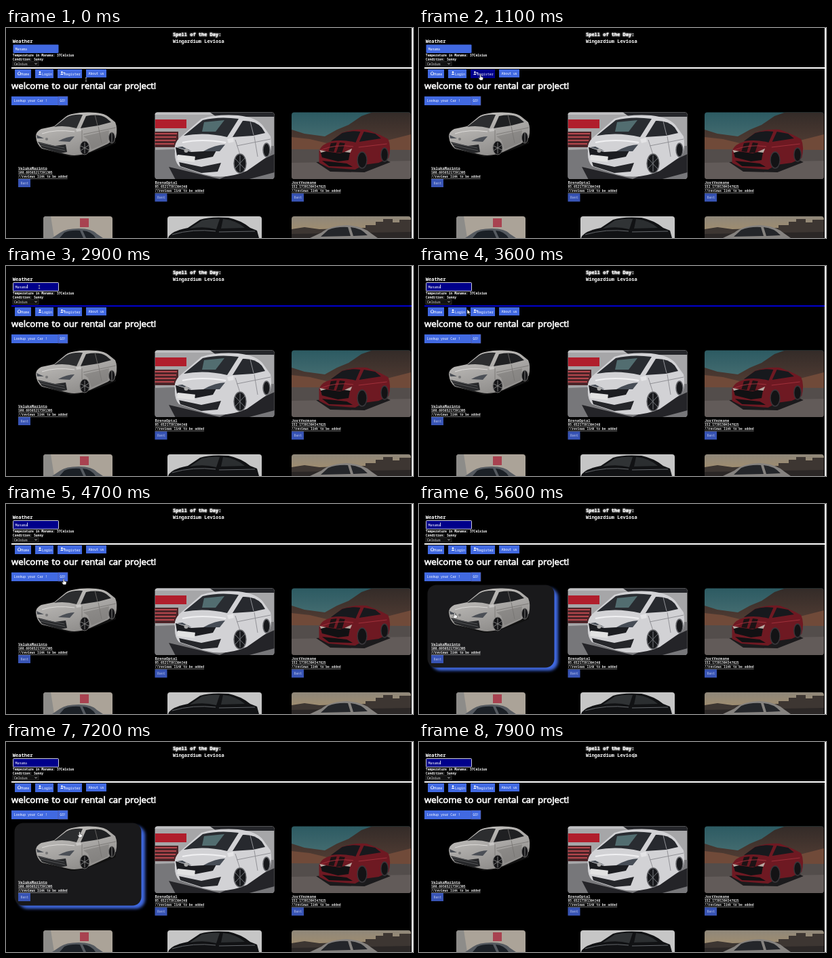
Recreate the animation shown at these times as an HTML page. Size 600 px wide and 310 px high, loop 8 s.

```html
<!DOCTYPE html>
<html lang="en">
<head>
<meta charset="utf-8">
<title>Rental cars</title>
<style>
html, body { margin: 0; width: 100%; height: 100%; overflow: hidden; background: #000; }
svg { display: block; width: 600px; height: 310px; }
text { font-family: "Noto Sans Mono", "DejaVu Sans Mono", monospace; fill: #fff; white-space: pre; }
.b { font-weight: 700; }
.u { font-weight: 600; text-decoration: underline; fill: #ddd; }
.dim { fill: #b8c3e8; }
.glow { font-weight: 700; text-shadow: 0 0 2px #fff, 0 0 3px #aaa; }
.title { font-family: "Open Sans", "Noto Sans", sans-serif; word-spacing: 1.2px; stroke: #fff; stroke-width: .7px; }
</style>
</head>
<body>
<svg id="stage" viewBox="0 0 600 310">
<defs>
  <clipPath id="p2"><rect x="219.5" y="124.5" width="176" height="98.5" rx="4"/></clipPath>
  <clipPath id="p3"><rect x="421" y="124.5" width="176" height="98.5" rx="4"/></clipPath>
  <clipPath id="p4"><rect x="55" y="278" width="102" height="60" rx="4"/></clipPath>
  <clipPath id="p5"><rect x="238" y="278" width="139" height="60" rx="4"/></clipPath>
  <clipPath id="p6"><rect x="421" y="278" width="176" height="60" rx="4"/></clipPath>
  <linearGradient id="paint" x2=".5" y2="1"><stop stop-color="#cbc9c6"/><stop offset="1" stop-color="#908e8c"/></linearGradient>
  <linearGradient id="sky" x2="0" y2="1"><stop stop-color="#2c5a62"/><stop offset="1" stop-color="#55797a"/></linearGradient>
  <linearGradient id="hill" x2="0" y2="1"><stop stop-color="#332b28"/><stop offset="1" stop-color="#5b4237"/></linearGradient>
  <linearGradient id="dawn" x2="0" y2="1"><stop stop-color="#8f877a"/><stop offset="1" stop-color="#a89069"/></linearGradient>
  <filter id="blur" x="-20%" y="-20%" width="140%" height="140%"><feGaussianBlur stdDeviation="2.2"/></filter>
</defs>

<g id="hover">
  <rect x="18" y="124" width="187" height="122" rx="14" fill="#4169e1" filter="url(#blur)"/>
  <rect x="12.5" y="119.5" width="187" height="122" rx="13" fill="#19191b"/>
</g>

<!-- white sedan -->
<g>
  <path d="M50 178L95 190Q112 191 162 170L160 160L60 174Z" fill="#111"/>
  <path d="M44 160Q44 153 52 149L71 145L88 131Q96 125 120 124.500Q143 124 151 131L161 139Q165 148 162 162L150 171L124 183Q106 190 92 187L53 178Q45 172 44 160Z" fill="url(#paint)"/>
  <path d="M71 146L89 132Q98 127 113 128L104 148Q86 143 71 146Z" fill="#2c2d2f"/>
  <path d="M110 148L118 130Q138 126 148 133L155 139L136 144Z" fill="#1f2022"/>
  <path d="M131 128L135 144M112 151L112 168M136 145L141 170M114 157L162 147" stroke="#74726f" stroke-width=".8" fill="none"/>
  <path d="M114 160L152 151L150 169L126 179L121 165Z" fill="#777573" opacity=".5"/>
  <path d="M47 168L72 174L88 172L90 183L80 185L53 177Z" fill="#262729"/>
  <path d="M49 170L86 177M51 173L87 181" stroke="#66676a" stroke-width=".7"/>
  <path d="M45 158L56 163L46 163ZM77 167Q90 160 101 160L94 168Z" fill="#4b4f56"/>
  <path d="M53 156Q73 149 101 153" stroke="#dedcda" fill="none"/>
  <path d="M103 149l7-1 1 4-7 1Z" fill="#c8c6c4"/>
  <circle cx="60" cy="164" r="2" fill="#777"/>
  <g fill="#141416" stroke="#6f6e6d"><ellipse cx="116" cy="177" rx="7" ry="10"/><ellipse cx="156" cy="162" rx="4.500" ry="8"/></g>
  <path d="M116 169V185M110 174L122 180M110 181L122 173M156 155V169" stroke="#8a8a8a" stroke-width=".9"/>
</g>

<!-- white hatchback in a showroom -->
<g clip-path="url(#p2)">
  <path d="M219 124H396V224H219Z" fill="#a6a6a8"/>
  <path d="M219 124H396V128H219Z" fill="#c0c0c2"/>
  <path d="M300 124H396V131H310Z" fill="#25262a"/>
  <rect x="220" y="135" width="46" height="13" fill="#b01e2c"/>
  <path d="M219 153H254V176H219Z" fill="#4b2428"/>
  <path d="M219 156H252M219 161H251M219 166H250M219 171H248" stroke="#b5474d" stroke-width="2"/>
  <path d="M219 180L396 174V224H219Z" fill="#77777a"/>
  <path d="M240 205L315 223L396 186V213L355 224H250Z" fill="#242428"/>
  <path d="M249 182Q247 171 256 162L288 134Q310 127 342 129Q371 132 380 146L390 160Q393 177 388 188L355 211Q322 225 291 216L255 204Q248 196 249 182Z" fill="#d2d2d5"/>
  <path d="M262 159L290 136Q314 130 343 134L326 161Q293 153 262 159Z" fill="#292c31"/>
  <path d="M292 139L322 136L309 153L289 153Z" fill="#526d70"/>
  <path d="M334 161L349 137Q367 136 377 147L382 155L364 159Z" fill="#27292e"/>
  <path d="M360 138L365 158M338 165L346 190M366 160L371 190M340 174L390 164" fill="none" stroke="#919196"/>
  <path d="M250 176L273 183L310 181L305 190L279 195L252 188Z" fill="#1c1d21"/>
  <path d="M255 198L288 205L317 199L312 212L288 214L257 204Z" fill="#25262a"/>
  <path d="M252 176L260 175L274 182ZM291 182Q309 172 323 172L315 182Z" fill="#474d56"/>
  <path d="M260 169Q288 163 324 169" fill="none" stroke="#f1f1f3" stroke-width="2"/>
  <rect x="253" y="187" width="26" height="8" transform="rotate(6 253 187)" fill="#e2e2e2"/>
  <circle cx="265.500" cy="181" r="3" fill="#aaa"/>
  <path d="M326 164l9-2 1 6-8 2Z" fill="#e4e4e6"/>
  <g fill="#17181b" stroke="#66676b" stroke-width="1.500"><ellipse cx="345" cy="200" rx="9" ry="14"/><ellipse cx="384" cy="180" rx="5" ry="10"/></g>
  <path d="M345 188V212M338 193L352 208M338 207L352 192" stroke="#74777c"/>
</g>

<!-- red coupe by the hills -->
<g clip-path="url(#p3)">
  <path d="M421 124H597V190H421Z" fill="url(#sky)"/>
  <path d="M421 150L440 156L470 160L488 150L505 143L524 130L541 124H597V190H421Z" fill="url(#hill)"/>
  <path d="M421 161L448 164L477 171V190H421ZM546 170L597 157V190H546Z" fill="#704a39"/>
  <path d="M421 179L597 180V224H421Z" fill="#534d4b"/>
  <path d="M421 199L597 196V224H421Z" fill="#625b59"/>
  <g transform="translate(50 0) scale(.87 1)">
    <path d="M468 198L492 212L550 213L594 198L574 190Z" fill="#1b1a1c"/>
    <path d="M473 181Q478 171 493 168L511 155Q528 149 554 150L577 158L590 164Q596 175 591 192L574 199L549 202L534 209L489 206L473 199Z" fill="#6e1922"/>
    <path d="M493 167L512 155Q526 151 543 153L535 169Q515 164 493 167Z" fill="#17191d"/>
    <path d="M541 168L549 153L568 156L578 163Z" fill="#17191d"/>
    <path d="M493 170L503 169L498 183L489 182ZM508 169L517 170L512 184L502 184Z" fill="#1d1315"/>
    <path d="M475 181L508 185L526 181L523 195L505 197L478 191ZM478 196L520 200L530 205L490 204Z" fill="#111113"/>
    <path d="M477 180Q501 171 531 175M540 176L588 171" stroke="#a3323d" fill="none"/>
    <path d="M474 180l11 2-9 2ZM516 183l13-5-3 6Z" fill="#b9a8a1"/>
    <g fill="#131315" stroke="#38363a" stroke-width="1.500"><ellipse cx="546" cy="195" rx="8" ry="12"/><ellipse cx="584" cy="187" rx="6" ry="10"/></g>
  </g>
</g>

<!-- second row -->
<g clip-path="url(#p4)">
  <path d="M55 278H157V310H55Z" fill="#aba398"/>
  <path d="M55 278H66L71 310H55Z" fill="#8d8c89"/>
  <rect x="109" y="281" width="13" height="13" fill="#a84250"/>
  <path d="M68 310L80 302Q88 296 107 296Q127 296 134 304L143 310Z" fill="#555a60"/>
  <path d="M79 310L86 302Q95 298 109 299L114 310ZM113 299Q126 300 132 310H118Z" fill="#1b2026"/>
</g>
<g clip-path="url(#p5)">
  <path d="M238 278H377V310H238Z" fill="#c6c6c6"/>
  <path d="M239 310Q242 300 268 295L286 283Q301 278 328 280Q347 284 360 295L370 299L373 310Z" fill="#111214"/>
  <path d="M271 296L289 284Q302 281 315 282L310 297Q291 292 271 296Z" fill="#303335"/>
  <path d="M317 296L320 282Q340 284 352 295Z" fill="#2b2e30"/>
  <path d="M245 305Q276 296 309 300M314 301L367 300" fill="none" stroke="#63666a"/>
</g>
<g clip-path="url(#p6)">
  <path d="M421 278H597V310H421Z" fill="url(#dawn)"/>
  <path d="M421 297L440 294L462 297L530 295V291H545V286H556V282H570V287H580V283H597V310H421Z" fill="#3d3632"/>
  <path d="M421 304L597 301V310H421Z" fill="#2b2726"/>
  <path d="M448 310L465 302Q477 292 501 291Q526 292 538 303L548 310Z" fill="#85827f"/>
  <path d="M464 308L475 298Q488 293 504 294L508 307ZM508 294Q523 295 533 306L512 307Z" fill="#24262a"/>
</g>

<g id="ui"></g>
<g id="pointer"></g>
</svg>
<script>
const $ = id => document.getElementById(id);
const BLUE = '#4169e1', NAVY = '#00008b';
const rect = (x, y, w, h, fill, extra = '') =>
  `<rect x="${x}" y="${y}" width="${w}" height="${h}" fill="${fill}" ${extra}/>`;
const text = (x, y, size, str, cls = '') =>
  `<text x="${x}" y="${y}" font-size="${size}" class="${cls}">${str}</text>`;
const person = x =>
  `<circle cx="${x}" cy="65.300" r="1.250" fill="#fff"/><path d="M${x - 2.4} 69Q${x} 65.500 ${x + 2.4} 69Z" fill="#fff"/>`;

const card = (x, y, name, price) =>
  text(x, y, 5.5, name, 'u') +
  text(x, y + 6.4, 4.7, price, 'u') +
  text(x, y + 12.5, 4.68, '//reviews link to be added', 'u') +
  rect(x, y + 14.5, 18, 12, '#3854b4') +
  text(x + 3.6, y + 22, 4.8, 'Rent', 'dim');

$('ui').innerHTML =
  text(246, 11.8, 7, 'Spell of the Day:', 'glow') +
  text(246, 22, 7, 'Wingardium Leviosa', 'b') +
  text(9.8, 22, 7.1, 'Weather', 'b') +
  rect(10.5, 24.5, 67, 12.5, BLUE, 'id="city" rx="1" stroke-width=".8"') +
  text(13.7, 32.5, 4.8, 'Manama') +
  rect(31, 27.5, .8, 5.5, '#fff', 'id="caret"') +
  text(9.8, 42.3, 4.74, 'Temperature in Manama: 37Celsius', 'b') +
  text(9.8, 48.3, 4.74, 'Condition: Sunny', 'b') +
  rect(10, 49.7, 38, 6.6, '#111', 'stroke="#555" stroke-width=".5"') +
  text(12, 54.6, 4.7, 'Celsius') +
  '<path d="M42.500 52l1.500 1.500 1.500-1.500" fill="none" stroke="#fff" stroke-width=".8"/>' +
  rect(8, 58, 590, 2, '#fff', 'id="rule"') +
  rect(598, 0, 2, 310, '#fff') +
  rect(13, 61, 24, 13, BLUE) +
  rect(43, 61, 27, 13, BLUE) +
  rect(76, 61, 36, 13, BLUE, 'id="register"') +
  rect(118, 61, 30, 12, BLUE, 'id="about"') +
  '<path d="M16.800 67l2.700-2.500 2.700 2.500M17.700 66.500v2.600h3.600v-2.600" fill="none" stroke="#fff" stroke-width=".8"/>' +
  person(50) + person(82.4) +
  '<path d="M85.500 65v2.400M84.300 66.200h2.400" stroke="#fff" stroke-width=".7"/>' +
  text(22.3, 70, 5, 'Home') + text(53, 70, 5, 'Login') +
  text(85.8, 70, 5, 'Register') + text(121.5, 69, 4.85, 'About us') +
  text(8, 89.5, 13.2, 'welcome to our rental car project!', 'title') +
  rect(8, 101, 69, 13, BLUE) +
  rect(77, 101, 14, 13, BLUE, 'stroke="#55568f" stroke-width=".6"') +
  text(11.8, 109, 4.8, 'Lookup your Car !') + text(79.5, 109, 4.8, 'GO!') +
  card(18, 208.5, 'VelukaMarinto', '108.69565217391305') +
  card(219.5, 229.8, 'BrenaOptal', '95.65217391304348') +
  card(421, 229.8, 'JostVermane', '152.17391304347825');

const shapes = {
  arrow: '<path d="M0 0V7L1.700 5.500 3 8 4 7.500 2.900 5.100H5Z" fill="#fff" stroke="#222" stroke-width=".5"/>',
  hand: '<path d="M-.8 0Q0-.8.8 0V3L3.800 3.800Q4.500 4.500 3.300 8H-.7L-2.800 4.600Q-2.200 3.700-.8 5Z" fill="#fff" stroke="#222" stroke-width=".5"/>',
  beam: '<path d="M-1.200-2.500h2.400M0-2.500v5M-1.200 2.500h2.400" fill="none" stroke="#bbb" stroke-width=".7"/>'
};

// time, x, y
const path = [
  [0, 118, 76], [300, 118, 75], [900, 91, 69], [1300, 90, 69], [2000, 49, 31], [2900, 49, 31],
  [3600, 71, 64], [4500, 85, 111], [4900, 85, 111], [5700, 51, 163], [6900, 51, 164], [7900, 317, 20]
];

function place(t) {
  const i = path.findIndex(p => p[0] > t);
  if (i < 0) return path.at(-1).slice(1);
  const [a, b] = [path[i - 1], path[i]];
  let k = (t - a[0]) / (b[0] - a[0]);
  k = k * k * (3 - 2 * k);
  return [a[1] + (b[1] - a[1]) * k, a[2] + (b[2] - a[2]) * k];
}

const start = performance.now();
function draw(now) {
  const t = Math.floor(Math.max(0, now - start) % 8000 / 100) * 100;
  const [x, y] = place(t);
  const over = (l, top, r, bottom) => x >= l && x <= r && y >= top && y <= bottom;
  const paint = (id, fill) => $(id).setAttribute('fill', fill);
  const onRegister = over(76, 61, 112, 74), onAbout = over(118, 61, 148, 73);
  const onCard = over(13, 119, 199, 241), onCity = over(10, 24, 78, 37);
  const focused = t >= 2500;

  paint('register', onRegister ? NAVY : BLUE);
  paint('about', onAbout ? NAVY : BLUE);
  paint('city', focused ? NAVY : BLUE);
  $('city').setAttribute('stroke', focused ? '#fff' : 'none');
  paint('rule', t >= 1700 && t < 3800 ? '#0000cd' : '#fff');
  $('caret').style.opacity = focused && (t - 2500) % 1000 < 500 ? 1 : 0;
  $('hover').style.opacity = onCard ? 1 : 0;

  const onLink = onRegister || onAbout || onCard || over(43, 61, 70, 74) || over(77, 101, 91, 114);
  const onText = onCity || t < 400 || over(246, 15, 322, 24);
  $('pointer').innerHTML = shapes[onLink ? 'hand' : onText ? 'beam' : 'arrow'];
  $('pointer').setAttribute('transform', `translate(${x} ${y})`);
  requestAnimationFrame(draw);
}
draw(start);
</script>
</body>
</html>
```
